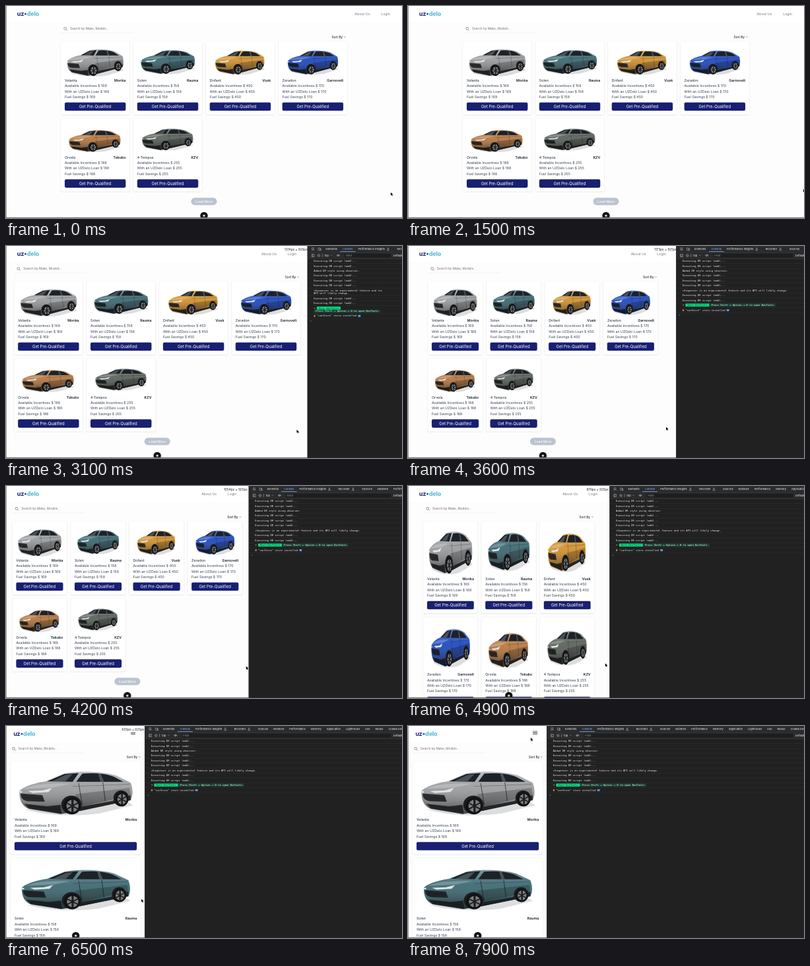
An HTML page for the animation above (8000 ms loop, 600 by 322 pixels).

```html
<!DOCTYPE html>
<html lang="en">
<head>
<meta charset="utf-8">
<title>Responsive car shop</title>
<style>
html, body { margin: 0; width: 100%; height: 100%; overflow: hidden; background: #fdfdfd; }
svg { display: block; overflow: visible; }
.stage { position: absolute; width: 1720px; height: 923px; overflow: hidden; transform: scale(.34884); transform-origin: 0 0;
  font: 15px/24px Inter, sans-serif; color: #374151; }
.stage * { box-sizing: border-box; }
.abs, .page, .dev, .cursor { position: absolute; }

.page { height: 923px; overflow: hidden; background: #fdfdfd; container-type: inline-size; }
header { position: absolute; width: 100%; height: 70px; background: #fff; color: #747a85; }
.logo { left: 32px; top: 20px; display: flex; align-items: center; font: 700 26px/28px Inter, sans-serif; color: #1b2478; letter-spacing: -.6px; }
.logo i { width: 9px; height: 9px; margin: 0 2px; border-radius: 50%; background: #2a58b0; }
.logo b { color: #53b9d2; }
nav { position: absolute; right: 52px; top: 22px; display: none; gap: 48px; }
.menu { right: 43px; top: 22px; width: 20px; height: 15px; border: solid #222; border-width: 2.5px 0; }
.menu::after { content: ""; display: block; margin-top: 4px; height: 2.5px; background: #222; }
.wrap { position: relative; margin: auto; padding: 154px 20px 0; }
.search { left: 20px; top: 82px; width: 318px; height: 36px; padding-left: 34px; border-bottom: 2px solid #eef0f2; font-size: 13.5px; line-height: 34px; color: #6d737d; }
.search svg { position: absolute; left: 6px; top: 9px; }
.sort { right: 20px; top: 123px; display: flex; gap: 5px; align-items: center; font-size: 13.5px; font-weight: 500; color: #222a35; }
.grid { display: grid; gap: 16px; }
.card { padding: 16px; border: 1px solid #f3f4f5; border-radius: 6px; background: #fff; box-shadow: 0 2px 5px #0000001c; white-space: nowrap; }
.car { width: 100%; height: 236px; }
.card:first-child .car { height: 226px; }
.names { display: flex; justify-content: space-between; font-weight: 500; }
.names b { font-weight: 600; color: #141a26; }
.button { margin-top: 12px; height: 36px; border-radius: 6px; background: #182071; color: #fff; font-size: 17px; line-height: 36px; text-align: center; }
.more { width: 112px; height: 32px; margin: 27px auto; border-radius: 16px; background: #bcc3d0; color: #f8fafc; line-height: 32px; text-align: center; font-weight: 500; font-size: 14.5px; }
.dock { left: calc(50% - 16px); top: 897px; width: 32px; height: 32px; border-radius: 50%; background: #111; box-shadow: 0 0 5px #0006; }
.dock::after { content: ""; position: absolute; left: 11px; top: 11px; width: 10px; height: 10px; border-radius: 50%; background: #ccc; }
.frame { inset: 0; border: solid #777; border-width: 0 0 3px 2px; }
.size { right: 0; top: 0; height: 28px; padding: 0 5px; background: #ffffffd0; color: #222; font-size: 13.5px; line-height: 28px; white-space: nowrap; }

@container (min-width: 640px) {
  .wrap { width: 640px; padding: 154px 12px 0; }
  .search { left: 12px; padding-left: 40px; }
  .search svg { left: 12px; }
  .sort { right: 17px; }
  .logo { left: 48px; }
  .menu { display: none; }
  nav { display: flex; }
  .grid { grid-template-columns: repeat(2, 1fr); }
  .car, .card:first-child .car { height: 222px; }
}
@container (min-width: 768px) { .wrap { width: 768px; } .grid { grid-template-columns: repeat(3, 1fr); } }
@container (min-width: 1024px) {
  .wrap { width: 1024px; }
  .grid { grid-template-columns: repeat(4, 1fr); }
  .car, .card:first-child .car { height: 141px; }
}
@container (min-width: 1280px) { .wrap { width: 1280px; padding: 154px 18px 0; } .search { left: 18px; } .sort { right: 24px; } }

.dev { right: 0; height: 923px; overflow: hidden; background: #212122; color: #eff0f2; border-left: 1px solid #484848; container-type: inline-size; }
.bar { position: relative; height: 28px; min-width: 295px; background: #2a2b2d; border-bottom: 1px solid #414245; font-size: 11.5px; line-height: 27px; white-space: nowrap; }
.bar svg { fill: none; stroke: #bfc2c6; stroke-width: 1.5; }
.tabs { left: 68px; display: flex; }
.tabs span { display: flex; align-items: center; gap: 9px; padding: 0 11.5px; }
.tabs svg { margin-right: 10px; }
.tabs .on { color: #8ab4f8; box-shadow: inset 0 -3px #8ab4f8; }
.filter { left: 158px; right: 45px; top: 3px; height: 21px; padding-left: 7px; border: 1px solid #454649; border-radius: 3px; background: #1d1e1f; color: #8f9398; line-height: 19px; }
.levels { left: calc(100% - 38px); }
.issues { display: none; height: 21px; padding-left: 8px; background: #2a2b2d; font-size: 11px; line-height: 21px; }
.issues i { display: inline-block; width: 9px; height: 9px; margin: 0 3px; border-radius: 2px; background: #4d8df0; }
.log { min-width: 305px; font: 11px/13px "DejaVu Sans Mono", monospace; }
.row { min-height: 21.3px; padding: 3.6px 0 3.6px 27px; border-bottom: 1px solid #353638; }
.row::before { content: ""; float: right; width: 60px; height: 13px; }
.row:last-child { padding-left: 11px; color: #6ea2f5; border: 0; }
.pill, .hint { display: inline-block; white-space: pre; border-radius: 3px 0 0 3px; background: #00dc82; color: #062; padding: 0 2px; font-weight: 500; }
.hint { border-radius: 0 3px 3px 0; background: #00dc8230; color: #eff0f2; }
.fruit, .new { display: inline-block; width: 7px; height: 9px; border-radius: 50%; background: #c08a3a; vertical-align: -1px; }
.new { width: 11px; border-radius: 2px; background: #5a9fd8; }
@container (max-width: 320px) { .tabs span:nth-child(n+3), .levels { display: none; } .issues { display: block; } }
.cursor { left: 0; top: 0; }
</style>
</head>
<body>
<svg width="0" height="0" style="position:absolute">
  <linearGradient id="sheen" x2="0" y2="1">
    <stop stop-color="#fff" stop-opacity=".3"/><stop offset=".4" stop-color="#888" stop-opacity=".08"/><stop offset="1" stop-opacity=".6"/>
  </linearGradient>
  <defs>
    <path id="body" d="M4 48C6 42 14 33 26 29L41 14C52 8 74 10 84 18L96 32C98 45 98 56 96 66L54 87 38 93 12 83C5 76 4 62 4 48Z"/>
    <g id="wheel"><ellipse cx="-.5" cy="-2" rx="8.4" ry="18" fill="#1b1d1f"/><ellipse rx="7" ry="16.5" fill="#111214"/>
      <ellipse cx=".4" rx="5" ry="12" fill="#7d8083"/><path d="M-4-5 5 6M-4 6 5-6M.4-12V12" stroke="#1c1e20" stroke-width="1.8"/></g>
  </defs>
  <symbol id="car" viewBox="3 9 95 87" preserveAspectRatio="none">
    <path fill="#0002" d="M8 84C30 98 52 97 70 92L98 76 92 66 40 84Z"/>
    <use href="#body" fill="currentColor"/>
    <use href="#body" fill="url(#sheen)"/>
    <path fill="#1d2227" d="M27 29 41 15 53 13 48 30ZM51 30 56 14C66 12 76 14 82 20L90 30Z"/>
    <path fill="#76828a" fill-opacity=".5" d="M31 29 42 17 48 15 42 29ZM69 13 71 13 74 30 71 30Z"/>
    <path fill="#fff" fill-opacity=".22" d="M7 44C16 35 28 33 46 34L32 41Z"/>
    <path fill="#17191c" fill-opacity=".85" d="M5 53 23 56 25 69 11 68C6 66 5 60 5 53ZM8 73 27 78 38 75 39 92 12 82ZM54 79 80 68 96 56 96 66 54 87Z"/>
    <path fill="#000" fill-opacity=".22" d="M50 54 95 42 96 56 54 79Z"/>
    <path fill="#dfe4e8" d="M11 48 23 47 31 42 28 50 15 52ZM4 48 6 48 6 52 4 51Z"/>
    <path fill="none" stroke="#0007" stroke-width=".7" d="M48 39 95 35M53 33 56 76M73 31 75 68M8 60 24 63M12 77 36 84"/>
    <use href="#wheel" x="47.5" y="77"/><use href="#wheel" transform="translate(88.500 64)scale(.76 .86)"/>
  </symbol>
</svg>

<div class="stage">
  <div class="page">
    <header>
      <div class="abs logo">uz<i></i><b>delo</b></div>
      <nav><span>About Us</span><span>Login</span></nav>
      <div class="abs menu"></div>
    </header>
    <div class="wrap">
      <div class="abs search"><svg width="17" height="17" fill="none" stroke="#6d737d" stroke-width="2"><circle cx="7" cy="7" r="5.5"/><path d="M11 11l5 5"/></svg>Search by Make, Models...</div>
      <div class="abs sort">Sort By<svg width="9" height="6" fill="none" stroke="#222a35" stroke-width="1.5"><path d="M1 1l3.5 3.5L8 1"/></svg></div>
      <div class="grid"></div>
      <div class="more">Load More</div>
    </div>
    <div class="abs dock"></div>
    <div class="abs frame"></div>
    <div class="abs size"></div>
  </div>

  <div class="dev">
    <div class="bar">
      <svg class="abs" width="60" height="26"><path d="M28 8H19V18H23M24 13l6 6M24 18v-5h5M46 9h9v9h-9zM52 12h6v7h-6"/></svg>
      <div class="abs tabs"></div>
    </div>
    <div class="bar">
      <svg class="abs" width="150" height="26"><path d="M18 8h11v11H18zM22 8v11M45 10l7 7M64 6v14M100 11l3 3 3-3M126 13q7-8 14 0q-7 8-14 0"/><circle cx="48.5" cy="13.5" r="5"/><circle cx="133" cy="13" r="2"/></svg>
      <span class="abs" style="left:74px">top</span>
      <div class="abs filter">Filter</div>
      <span class="abs levels">Default levels</span>
    </div>
    <div class="issues">2 Issues: <i></i>2</div>
    <div class="log"></div>
  </div>

  <svg class="cursor" width="12" height="17"><path d="M0 0V14L3.500 11 5.700 16 8.300 15 6 10H10.500Z" stroke="#fff" stroke-width="1.5" paint-order="stroke"/></svg>
</div>

<script>
const $ = selector => document.querySelector(selector);

// model, make, amount, paint, box of the car within its picture in %
const cars = [
  ['Velanta', 'Morika', 169, '#a3a5a7', 3, 11, 94, 86],
  ['Solen', 'Rauma', 158, '#43707a', 5, 14, 90, 76],
  ['Drifant', 'Vusk', 450, '#dc9a35', 8, 15, 82, 77],
  ['Zeradon', 'Garnovelt', 170, '#2450c8', 8, 15, 84, 77],
  ['Orvela', 'Tekubo', 188, '#c08048', 6, 23, 86, 70],
  ['4 Tempos', 'KZV', 255, '#626a62', 7, 19, 85, 69],
];
$('.grid').innerHTML = cars.map(([model, make, sum, paint, x, y, w, h]) => `<div class="card">
  <svg class="car" style="color:${paint}"><use href="#car" x="${x}%" y="${y}%" width="${w}%" height="${h}%"/></svg>
  <div class="names"><span>${model}</span><b>${make}</b></div>
  <div>Available Incentives $ ${sum}</div><div>With an UZDelo Loan $ ${sum}</div><div>Fuel Savings $ ${sum}</div>
  <div class="button">Get Pre-Qualified</div></div>`).join('');

const flask = '<svg width="11" height="12"><path d="M3 1h5M4 1v4L1 11h9L7 5V1"/></svg>';
$('.tabs').innerHTML = ['Elements', 'Console', 'Performance insights' + flask, 'Recorder' + flask, 'Sources', 'Network',
  'Performance', 'Memory', 'Application', 'Lighthouse', 'Vue', 'Redux', 'Colada DevTools']
  .map((tab, i) => `<span class="${i === 1 ? 'on' : ''}">${tab}</span>`).join('');

const run = 'Executing DR script (add)...';
$('.log').innerHTML = [run, run, 'Added DR style using observer.', run, run, run,
  '&lt;Suspense&gt; is an experimental feature and its API will likely change.', run, run,
  '➜ <span class="pill"> Nuxt DevTools </span><wbr><span class="hint"> Press Shift + Option + D to open DevTools </span>',
  '<i class="fruit"></i> "carStore" store installed <i class="new"></i>', '&gt;']
  .map(text => `<div class="row">${text}</div>`).join('');

// time, page width, left edge of the tools, cursor x, cursor y
const keys = [
  [0, 1720, 1720, 1671, 811],
  [300, 1720, 1720, 1671, 811],
  [800, 1720, 1720, 1717, 797],
  [1550, 1720, 1720, 1717, 797],
  [2600, 1456, 1454, 1405, 811],
  [3600, 1173, 1164, 1121, 788],
  [4200, 1054, 1054, 1043, 785],
  [5600, 699, 697, 671, 759],
  [5950, 605, 602, 588, 753],
  [6900, 605, 602, 588, 753],
  [7850, 605, 602, 533, 51],
  [8000, 605, 602, 533, 51],
];

function pose(t) {
  const next = keys.findIndex(key => key[0] > t);
  const a = keys[next - 1], b = keys[next];
  const part = (t - a[0]) / (b[0] - a[0]);
  return a.map((value, i) => value + (b[i] - value) * part);
}

function draw() {
  const t = performance.now() % 8000;
  const [, width, edge, x, y] = pose(t);
  $('.page').style.width = width + 'px';
  $('.dev').style.width = 1720 - edge + 'px';
  $('.dev').style.display = edge < 1720 ? '' : 'none';
  $('.size').style.display = t > 1550 && t < 6750 ? '' : 'none';
  $('.size').textContent = `${Math.round(width)}px × 925px`;
  $('.cursor').style.transform = `translate(${x}px, ${y}px)`;
  requestAnimationFrame(draw);
}
draw();
</script>
</body>
</html>
```
